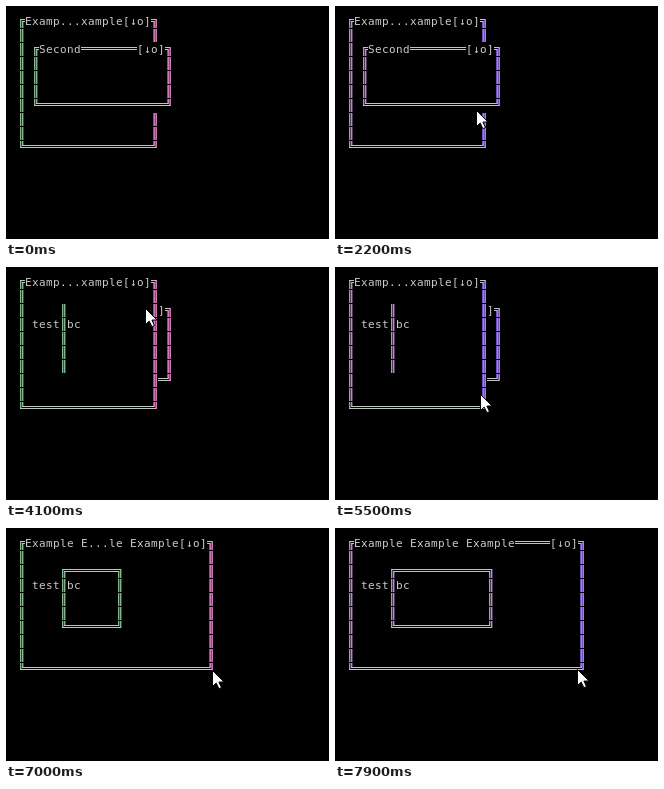
Write an HTML page with a canvas that moves like this. It is 323 by 233 pixels and loops after 8000 ms.

```html
<!DOCTYPE html>
<html lang="en">
<head>
<meta charset="utf-8">
<title>Text windows</title>
<style>
html, body { margin: 0; width: 100%; height: 100%; overflow: hidden; background: #000; }
canvas { display: block; }
</style>
</head>
<body>
<canvas id="stage" width="323" height="233"></canvas>
<script>
const ctx = document.getElementById('stage').getContext('2d');
const LOOP = 8000, STEP = 100;
const LEFT = 12, TOP = 8, CW = 7, CH = 14;
const LINE = '#bcc6bc', TEXT = '#cccccc';
const ENTER = 200, GROW = 2300, SEND_BACK = 4100, WIDEN = 6300;

// Strokes keep a colour fringe that depends on the column's subpixel phase:
// two pixels per stroke, green on even columns, violet to pink on odd ones.
const FRINGE = [['#84b48c', '#50385a'], ['#7050c0', '#cc78b4']];

// Pointer moves: begin, end, target x, target y, ease-out power
const moves = [
  [200, 400, 133, 105, 1],
  [400, 500, 145, 104, 1],
  [600, 800, 135, 99, 1],
  [900, 1800, 137, 99, 1],
  [2100, 2600, 146, 110, 3],
  [2700, 3200, 117, 58, 1],
  [3200, 3500, 131, 40, 1],
  [3600, 3900, 139, 41, 1],
  [4900, 5100, 140, 33, 1],
  [5100, 5900, 146, 140, 3],
  [6200, 6600, 171, 141, 1],
  [6600, 7000, 206, 142, 1],
  [7000, 7600, 242, 141, 1]
];

function pointer(t) {
  let x = 228, y = 66;
  for (const [begin, end, tx, ty, power] of moves) {
    if (t <= begin) break;
    const p = 1 - (1 - Math.min(1, (t - begin) / (end - begin))) ** power;
    x += (tx - x) * p;
    y += (ty - y) * p;
  }
  return [Math.round(x), Math.round(y)];
}

function rect(x, y, w, h, color) {
  ctx.fillStyle = color;
  ctx.fillRect(x, y, w, h);
}

const cellX = c => LEFT + c * CW;
const cellY = r => TOP + r * CH;

function clear(c, r, w, h) {
  rect(cellX(c), cellY(r), w * CW, h * CH, '#000');
}

function text(c, r, str) {
  clear(c, r, str.length, 1);
  ctx.fillStyle = TEXT;
  [...str].forEach((ch, i) => ctx.fillText(ch, cellX(c + i), cellY(r) + 11));
}

// One vertical stroke, broken by a thin gap above every row
function bar(c, y0, y1, dx) {
  FRINGE[c % 2].forEach((color, i) => rect(cellX(c) + dx + i, y0, 1, y1 - y0, color));
  for (let y = TOP; y < y1; y += CH) {
    if (y >= y0) rect(cellX(c) + dx, y, 2, 1, '#000');
  }
}

// Double-line frame with its corners at cells (c, r) and (c2, r2)
function frame(c, r, c2, r2) {
  clear(c, r, c2 - c + 1, 1);
  clear(c, r2, c2 - c + 1, 1);
  clear(c, r, 1, r2 - r + 1);
  clear(c2, r, 1, r2 - r + 1);
  if (c === c2) {
    for (const dx of [2, 4]) bar(c, cellY(r), cellY(r2 + 1), dx);
    return;
  }
  for (const d of [0, 2]) {
    const x0 = cellX(c) + 2 + d, x1 = cellX(c2) + 5 - d;
    const y0 = cellY(r) + 5 + d, y1 = cellY(r2) + 8 - d;
    bar(c, y0, y1, 2 + d);
    bar(c2, y0, y1, 4 - d);
    rect(x0, y0, x1 - x0, 1, LINE);
    rect(x0, y1 - 1, x1 - x0, 1, LINE);
  }
}

function fit(title, room) {
  if (title.length <= room) return title;
  const head = Math.floor((room - 3) / 2);
  return title.slice(0, head) + '...' + title.slice(head + 3 - room);
}

function panel(c, r, c2, r2, title) {
  clear(c, r, c2 - c + 1, r2 - r + 1);
  frame(c, r, c2, r2);
  text(c + 1, r, fit(title, c2 - c - 5));
  text(c2 - 4, r, '[↓o]');
}

function mainPanel(right) {
  panel(0, 0, right, 9, 'Example Example Example');
  text(2, 3, 'testabc');
  frame(6, 2, right - 13, 6);
}

function arrow(x, y) {
  ctx.save();
  ctx.translate(x + .5, y + .5);
  ctx.beginPath();
  [[0, 0], [0, 16], [3.7, 12.6], [6.4, 18.2], [9, 17], [6.4, 11.6], [11.5, 11.4]]
    .forEach(p => ctx.lineTo(...p));
  ctx.closePath();
  ctx.fillStyle = '#fff';
  ctx.strokeStyle = '#000';
  ctx.fill();
  ctx.stroke();
  ctx.restore();
}

function draw(t) {
  const [x, y] = pointer(t);
  const right = t < WIDEN ? 19 : Math.floor((x + 1 - LEFT) / CW);
  const layers = [
    () => mainPanel(right),
    () => panel(2, 2, 21, t < GROW ? 6 : 7, 'Second')
  ];
  if (t >= SEND_BACK) layers.reverse();

  rect(0, 0, 323, 233, '#000');
  ctx.font = '11px "DejaVu Sans Mono", monospace';
  layers.forEach(paint => paint());
  if (t >= ENTER) arrow(x, y);
}

const start = performance.now();
function tick() {
  const t = (performance.now() - start) % LOOP;
  draw(Math.floor(t / STEP) * STEP);
  requestAnimationFrame(tick);
}
tick();
</script>
</body>
</html>
```
